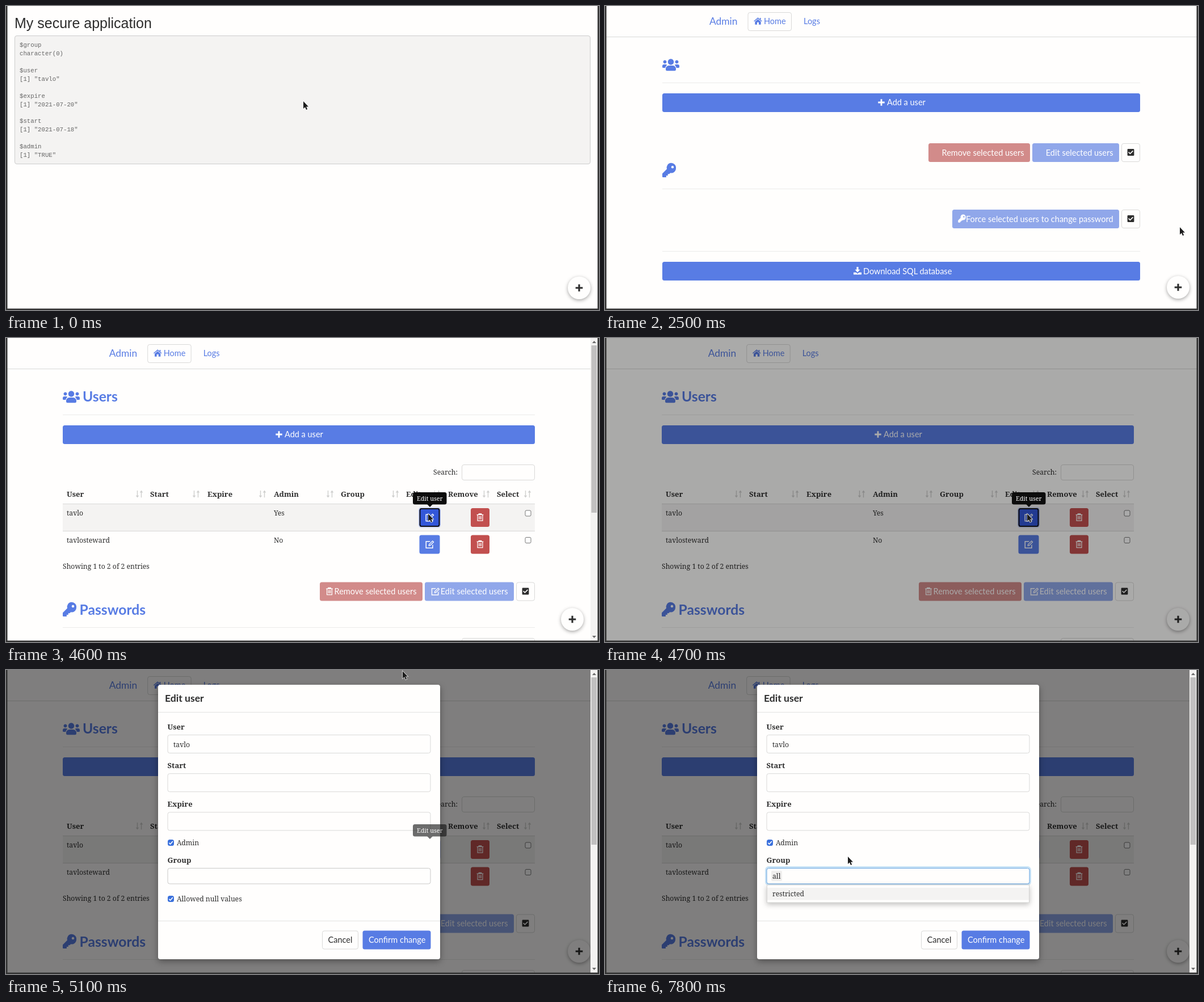
An HTML page that plays this animation: 1045x536 px, repeating every 8 s.

```html
<!DOCTYPE html>
<html lang="en">
<head>
<meta charset="utf-8">
<title>Admin panel walkthrough</title>
<style>
html, body { margin: 0; width: 100%; height: 100%; overflow: hidden; background: #fffefd; }
svg { display: block; width: 1045px; height: 536px; }
text { white-space: pre; fill: #2d2d2d; }
.title { font: 25px "Liberation Sans", Arial, sans-serif; }
.label { font: 12.5px "Liberation Sans", Arial, sans-serif; fill: #fff; }
.mono { font: 10.7px "Liberation Mono", "Courier New", monospace; fill: #666; }
.serif { font: 12.2px "Noto Serif", Georgia, serif; }
.strong { font: bold 13px "Noto Serif", Georgia, serif; }
.tip { font: 10.7px "Noto Serif", Georgia, serif; fill: #fff; }
.ui { font: 14.5px Lato, sans-serif; }
.brand { font: 17.4px Lato, sans-serif; }
.head { font: bold 24.7px Lato, sans-serif; }
.dialog { font: bold 17.6px Lato, sans-serif; }
.white { fill: #fff; }
.blue { fill: #587ce4; }
.round { filter: drop-shadow(0 2px 3px rgba(0,0,0,.35)); }
.modal { filter: drop-shadow(0 4px 6px rgba(0,0,0,.35)); }
.menu { filter: drop-shadow(0 3px 5px rgba(0,0,0,.25)); }
</style>
</head>
<body>
<svg id="stage" viewBox="0 0 1045 536"></svg>
<script>
const LOOP = 8000, STEP = 100;
const BLUE = '#587ce4', PALE_BLUE = '#90a7ea', RED = '#c2504f', PALE_RED = '#d28b8a';
const INK = '#2d2d2d', LINE = '#d9d9d8', PAPER = '#fffefd';
const USERS = [['tavlo', 'Yes'], ['tavlosteward', 'No']];

// Icons live on a 16-unit square, except "users", which is 20 wide.
const ICONS = {
  plus: 'M6.4 1.5h3.2v4.9h4.9v3.2H9.6v4.9H6.4V9.6H1.5V6.4h4.9z',
  home: 'M8 1L16 8 15 9.2 8 3.2 1 9.2 0 8zM8 4.5L13.7 9.3V15H9.7V10.5H6.3V15H2.3V9.3zM11.7 2h2v3.6l-2-1.7z',
  users: 'M10 1.5a3.5 3.5 0 1 0 .01 0zM3 3a2 2 0 1 0 .01 0zM17 3a2 2 0 1 0 .01 0z' +
    'M4 13a3.6 3.6 0 0 1 3.6-3.6h4.8A3.6 3.6 0 0 1 16 13v1a1.5 1.5 0 0 1-1.5 1.5h-9A1.5 1.5 0 0 1 4 14z' +
    'M0 10a2 2 0 0 1 2-2h2a2 2 0 0 1 1.5.7A6 6 0 0 0 3.4 12H1a1 1 0 0 1-1-1z' +
    'M20 10a2 2 0 0 0-2-2h-2a2 2 0 0 0-1.5.7A6 6 0 0 1 16.6 12H19a1 1 0 0 0 1-1z',
  key: 'M16 5.5A5.5 5.5 0 0 1 9.4 10.9L8.2 12.2H6.5V14H4.6V16H.8A.8.8 0 0 1 0 15.2V11.6L5.3 6.3A5.5 5.5 0 1 1 16 5.5z' +
    'M12 2.5a1.5 1.5 0 1 0 .01 0z',
  download: 'M6.2 0h3.6v5.5h3.3L8 11 2.9 5.5h3.3zM0 11h4.7L8 13.8 11.3 11H16v4.5H0z',
  check: 'M2.5 1h11A1.5 1.5 0 0 1 15 2.5v11a1.5 1.5 0 0 1-1.5 1.5h-11A1.5 1.5 0 0 1 1 13.5v-11A1.5 1.5 0 0 1 2.5 1z' +
    'M6.7 12.2L13.3 5.6 11.9 4.2 6.7 9.4 4.1 6.8 2.7 8.2z',
  trash: 'M5 0h6l1 2h3v1.6h-1V16H2V3.6H1V2h3zM3.5 3.6V14.5H12.5V3.6z' +
    'M5.2 5.5h1.2v7H5.2zM7.4 5.5h1.2v7H7.4zM9.6 5.5h1.2v7H9.6z',
  edit: 'M0 2H9L7.4 3.6H1.6V14.4H12.4V10.2L14 8.6V16H0zM5.8 8.2L13 1 16 4 8.8 11.2 5.3 11.7zM7.2 8.8L13 3 14 4 8.2 9.8 7 10z',
  exit: 'M9 2.8L15.8 8 9 13.2V10.2H4.8V5.8H9zM6.5 2H3a2.5 2.5 0 0 0-2.5 2.5v7A2.5 2.5 0 0 0 3 14h3.5v-2H3a.6.6 0 0 1-.6-.6V4.6A.6.6 0 0 1 3 4h3.5z',
  sort: 'M3.2 1h1.6v10H7.2L4 15.4.8 11h2.4zM11.2 15h1.6V5h2.4L12 .6 8.8 5h2.4z',
  cogs: gear(5, 8, 5) + gear(13, 3.8, 3) + gear(13, 12.2, 3)
};

function gear(cx, cy, r) {
  let d = '';
  for (let i = 0; i < 32; i++) {
    const a = (i - .5) * Math.PI / 16, q = i % 4 < 2 ? r : r * .76;
    d += (i ? 'L' : 'M') + (cx + q * Math.cos(a)).toFixed(2) + ' ' + (cy + q * Math.sin(a)).toFixed(2);
  }
  const h = r * .36;
  return `${d}zM${cx - h} ${cy}a${h} ${h} 0 1 0 ${2 * h} 0a${h} ${h} 0 1 0 ${-2 * h} 0z`;
}

// Cursor path: time, x, y of the hotspot
const PATH = [
  [0, 524, 168], [400, 955, 471], [500, 955, 471], [800, 1019, 495], [1300, 1019, 495],
  [1700, 1013, 388], [2400, 1013, 388], [2500, 1013, 390], [2600, 1013, 354], [2700, 1013, 354],
  [2800, 930, 36], [2900, 930, 36], [3400, 843, 237], [3500, 843, 237], [3900, 107, 314],
  [4200, 744, 310], [4900, 744, 310], [5000, 735, 150], [5100, 699, 2], [5200, 577, 1],
  [5300, 414, 123], [5400, 414, 123], [5500, 400, 240], [5600, 385, 351], [5700, 385, 351],
  [5800, 385, 362], [6200, 385, 362], [6500, 320, 388], [7000, 320, 388], [7800, 428, 329], [8000, 428, 329]
];

const ramp = (t, a, b) => Math.min(1, Math.max(0, (t - a) / (b - a)));
const text = (x, y, s, cls, extra = '') => `<text x="${x}" y="${y}" class="${cls}" ${extra}>${s}</text>`;
const rect = (x, y, w, h, fill, extra = '') =>
  `<rect x="${x}" y="${y}" width="${w}" height="${h}" fill="${fill}" ${extra}/>`;
const box = (x, y, w, h, fill = PAPER, stroke = LINE, r = 3.5) =>
  rect(x + .5, y + .5, w - 1, h - 1, fill, `rx="${r}" stroke="${stroke}"`);
const button = (x, y, w, h, fill) => rect(x, y, w, h, fill, 'rx="3.5"');
const rule = (x, y, w, color = '#ebebea') => rect(x, y, w, 1, color);
const path = (d, fill, extra = '') => `<path d="${d}" fill="${fill}" ${extra}/>`;
const group = (body, extra) => `<g ${extra}>${body}</g>`;

function icon(name, cx, cy, size, fill, turn = 0) {
  const half = name === 'users' ? 10 : 8;
  return path(ICONS[name], fill, `fill-rule="evenodd"
    transform="translate(${cx} ${cy}) rotate(${turn}) scale(${size / 16}) translate(${-half} -8)"`);
}

function roundButton(cx, cy, r, content, scale = 1) {
  return group(`<circle r="${r}" fill="${PAPER}" class="round"/>${content}`,
    `transform="translate(${cx} ${cy}) scale(${scale})"`);
}

function fab(x, y, open = 0) {
  return roundButton(x, y, 20, icon('plus', 0, 0, 15.5, open > .5 ? '#2c4a80' : INK, 45 * open));
}

function homePage(t) {
  const lines = ['$group', 'character(0)', '', '$user', `[1] "${USERS[0][0]}"`, '', '$expire',
    '[1] "2021-07-20"', '', '$start', '[1] "2021-07-18"', '', '$admin', '[1] "TRUE"'];
  const open = ramp(t, 700, 1100), label = ramp(t, 1600, 1800);
  let out = text(15, 39, 'My secure application', 'title') + box(15, 52, 1015, 227, '#f4f3f2', '#ccc');
  lines.forEach((s, i) => out += text(24, 72 + i * 14.93, s, 'mono'));
  if (open) {
    out += roundButton(1009, 394, 17, icon('cogs', 0, -1, 13.5, INK), open);
    out += roundButton(1009, 443.5, 17, icon('exit', 0, -1, 11.5, INK), open);
  }
  if (label) out += group(rect(854, 383, 128, 22, '#000', 'rx="3" fill-opacity=".45"') +
    text(864, 398, 'Administrator mode', 'label'), `opacity="${label}"`);
  return out + fab(1010, 497, open);
}

function bulkActions(right, y, icons) {
  const editW = icons ? 157 : 153, removeW = icons ? 181 : 179;
  const editX = right - 37 - editW, removeX = editX - 4 - removeW;
  let out = button(removeX, y, removeW, 33, PALE_RED) + button(editX, y, editW, 33, PALE_BLUE) +
    text(right - 47.5, y + 21.5, 'Edit selected users', 'ui white', 'text-anchor="end"') +
    text(editX - 14.5, y + 21.5, 'Remove selected users', 'ui white', 'text-anchor="end"');
  if (icons) out += icon('trash', removeX + 17, y + 16, 13.5, '#fff') + icon('edit', editX + 19, y + 16, 14.5, '#fff');
  return out + selectAll(right, y);
}

const selectAll = (right, y) => box(right - 33, y, 33, 33) + icon('check', right - 16.5, y + 16, 13.5, INK);

function adminTop(left, right, headings) {
  const mid = (left + right) / 2, nav = left === 101 ? 0 : -2.3;
  let out = text(184 + nav, 33, 'Admin', 'brand blue') + box(251.5 + nav, 11, 77.5, 33) +
    icon('home', 269.5 + nav, 26.5, 14.5, BLUE) + text(280 + nav, 32, 'Home', 'ui blue') +
    text(350 + nav, 32, 'Logs', 'ui blue') + rule(2, 54, 1041, LINE) +
    icon('users', left + 15, 103, 24, BLUE) + rule(left, 135, right - left) +
    button(left, 154, right - left, 33, BLUE) + icon('plus', mid - 35, 170, 14, '#fff') +
    text(mid - 25, 175, 'Add a user', 'ui white');
  if (headings) out += text(left + 35, 112, 'Users', 'head blue');
  return out;
}

function loadingPage(t) {
  const left = 101, right = 943, w = right - left, headings = t >= 2800;
  return adminTop(left, right, headings) + bulkActions(right, 242, t >= 2600) +
    icon('key', 113, 290, 24, BLUE) + (headings ? text(130, 298, 'Passwords', 'head blue') : '') +
    rule(left, 322, w) + button(612, 359, 294, 33, PALE_BLUE) + icon('key', 629, 375, 13.5, '#fff') +
    text(895.5, 380.5, 'Force selected users to change password', 'ui white', 'text-anchor="end"') +
    selectAll(right, 359) + rule(left, 432, w) + button(left, 451, w, 33, BLUE) +
    icon('download', 445, 467, 14, '#fff') + text(455, 472.5, 'Download SQL database', 'ui white') +
    fab(1010, 496);
}

function usersPage(t) {
  const left = 100, right = 932, w = right - left;
  const columns = [['User', 107, 235], ['Start', 254, 335], ['Expire', 355, 452], ['Admin', 472, 571],
    ['Group', 590, 686], ['Edit', 705, 759], ['Remove', 779, 846], ['Select', 865, 919]];
  let out = adminTop(left, right, true) + text(753, 241, 'Search:', 'serif') + box(803, 223, 129, 28) +
    rect(left, 292, w, 48, '#f4f3f2') + rule(left, 292, w, LINE) + rule(left, 340, w, LINE);
  for (const [name, x, arrows] of columns)
    out += text(x, 280, name, 'strong') + icon('sort', arrows, 275, 14, '#cfcfce');
  USERS.forEach(([name, admin], i) => {
    const y = 300 + i * 47.5, focused = i === 0 && t >= 4600, hovered = i === 0 && t >= 4200;
    out += text(107, y + 13, name, 'serif') + text(472, y + 13, admin, 'serif') +
      button(728.5, y, 36, 33, focused ? '#3357d9' : hovered ? '#3d66df' : BLUE) +
      icon('edit', 747, y + 16, 15, '#fff') + button(819, y, 33, 33, RED) +
      icon('trash', 835.5, y + 16, 13.5, '#fff') + box(914.5, y + 3.5, 11, 11, '#fff', '#767676', 2);
    if (focused) out += rect(729.5, y + 1, 34, 31, 'none', 'rx="3" stroke="#101018" stroke-width="2"') +
      rect(727.5, y - 1, 38, 35, 'none', 'rx="4" stroke="#b9c7f2"');
  });
  out += text(left, 407, 'Showing 1 to 2 of 2 entries', 'serif') + bulkActions(right, 430.5, true) +
    icon('key', 112, 479, 24, BLUE) + text(129.5, 487.5, 'Passwords', 'head blue') +
    rule(left, 510, w) + box(803, 529, 129, 28);
  return out + fab(t < 4700 ? 998 : 1010, 496);
}

const scrollbar = () => rect(1030, 0, 13, 534, '#f3f2f1') + rect(1031.5, 13, 9.5, 295, '#c1c0c0') +
  path('M1033 9h7l-3.5-4zM1033 525h7l-3.5 4z', '#6a6a6a');

const checkbox = (y, label) => button(285, y, 11, 11, '#3a70dc') +
  path(`M287.3 ${y + 5.7}l2.3 2.4 4.3-5`, 'none', 'stroke="#fff" stroke-width="1.6"') +
  text(301, y + 10, label, 'serif');

function dropdown(t) {
  const picked = t >= 6800;
  const options = picked ? ['restricted'] : ['all', 'restricted'];
  const active = picked ? t >= 7100 : t >= 6400;
  const h = 9.5 + options.length * 21.5;
  return rect(285.5, 379, 462, h, PAPER, 'class="menu" stroke="#d5d5d4"') +
    (active ? rect(286, 384, 461, 21.5, '#f4f3f2') : '') +
    options.map((s, i) => text(295, 399 + i * 21.5, s, 'serif')).join('');
}

function modal(t) {
  const focus = t >= 5800, picked = t >= 6800;
  let out = rect(268, 26, 497, 484, PAPER, 'rx="4" class="modal"') +
    text(280, 55.5, 'Edit user', 'dialog') + rule(268, 74, 497, '#e2e2e1') + rule(268, 442, 497, '#e2e2e1');
  ['User', 'Start', 'Expire'].forEach((name, i) =>
    out += text(284.5, 105 + i * 68, name, 'strong') + box(284.5, 114 + i * 68.2, 464, 33));
  out += text(295, 135.5, USERS[0][0], 'serif') + checkbox(299, 'Admin') +
    text(284.5, 340, 'Group', 'strong') + checkbox(398, 'Allowed null values');
  if (focus) out += rect(283.5, 347.5, 466, 31, 'none', 'rx="5" stroke="#66afe9" stroke-opacity=".35" stroke-width="3"');
  out += box(284.5, 349, 464, 28.5, PAPER, focus ? '#66a3e0' : '#c9c9c8');
  if (picked) out += rect(293, 354, 19, 18, '#efeeed', 'rx="2"') + text(295, 367.5, 'all', 'serif');
  const caret = (t >= 5800 && t < 6300) || (t >= 6900 && t < 7400);
  if (caret) out += rect(picked ? 315 : 296, 354, 1, 18, INK);
  out += box(557, 459.5, 64, 33) + text(567.5, 481, 'Cancel', 'ui') +
    button(628.5, 459.5, 120, 33, BLUE) + text(639, 481, 'Confirm change', 'ui white');
  if (focus && t !== 6800) out += dropdown(t);
  return out;
}

const tooltip = () => button(717, 272, 59.5, 21.5, '#0c0c0c') + path('M742 293h10l-5 5z', '#0c0c0c') +
  text(724, 287, 'Edit user', 'tip');

function cursor(t) {
  const i = Math.max(1, PATH.findIndex(k => k[0] >= t));
  const [a, b] = [PATH[i - 1], PATH[i]], p = ramp(t, a[0], b[0]);
  const x = a[1] + (b[1] - a[1]) * p, y = a[2] + (b[2] - a[2]) * p;
  const inForm = t >= 5600;
  const hand = (t >= 700 && t < 2300) || (inForm && y > 378);
  const beam = inForm && y > 348 && y <= 378;
  const shape = hand
    ? path('M-1.5 1.5a1.5 1.5 0 0 1 3 0V5.5l6 1.2q1.5.5 1.5 2V11.5l-1.5 3.5h-7l-4.5-5.5q0-1.5 3 .3z', '#fff', 'stroke="#222"') +
      path('M3 10.5v3M5 10.5v3', 'none', 'stroke="#222" stroke-width=".8"')
    : beam
      ? path('M-2.5-7.5Q0-7.5 0-6V6Q0 7.5-2.5 7.5M2.5-7.5Q0-7.5 0-6V6Q0 7.5 2.5 7.5', 'none', 'stroke="#222"')
      : path('M0 0V13L3 10.3 5.1 15 7.1 14.1 5.1 9.5H9z', '#1c1c1c', 'stroke="#fff" stroke-width="1.2" paint-order="stroke"');
  return group(shape, `transform="translate(${x.toFixed(1)} ${y.toFixed(1)})"`);
}

function scene(t) {
  let out = rect(0, 0, 1045, 536, PAPER);
  out += t < 2500 ? homePage(t) : t < 3000 ? loadingPage(t) : usersPage(t);
  if (t >= 3000 && t < 4700) out += scrollbar();
  const dim = ramp(t, 4600, 4750) * .5;
  if (dim) out += rect(0, 0, 1045, 536, '#000', `opacity="${dim}"`);
  const fade = ramp(t, 4732, 4882);
  if (fade) {
    const drop = -121 * Math.pow(1 - ramp(t, 4732, 5032), 1.62);
    out += group(scrollbar() + group(modal(t), `transform="translate(0 ${drop.toFixed(1)})"`), `opacity="${fade}"`);
  }
  const tip = ramp(t, 4300, 4450) * (1 - ramp(t, 5040, 5190));
  if (tip) out += group(tooltip(), `opacity="${tip}"`);
  const frame = path('M0 0H2.5V533.5H1042.5V0H1045V536H0z', '#333');
  return out + frame + cursor(t);
}

const stage = document.getElementById('stage');
const start = performance.now();
let shown = -1;

function tick() {
  const t = Math.floor((performance.now() - start) % LOOP / STEP) * STEP;
  if (t !== shown) stage.innerHTML = scene(shown = t);
  requestAnimationFrame(tick);
}
tick();
</script>
</body>
</html>
```
